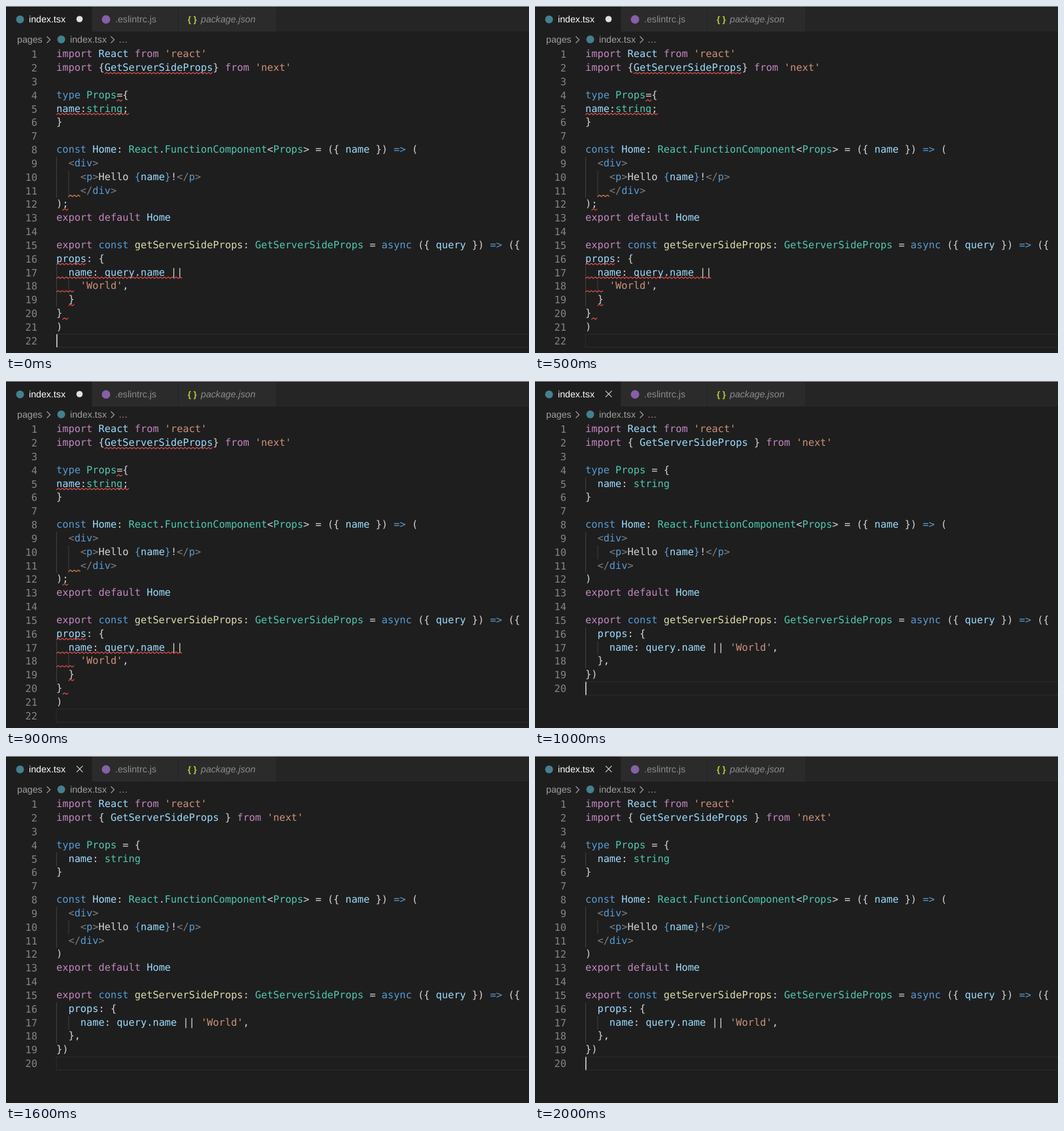
Animation of 800 by 530 pixels, one loop 2.1 s. Source, as an HTML page:

```html
<!DOCTYPE html>
<html lang="en">
<head>
<meta charset="utf-8">
<title>Format on save</title>
<style>
html, body { margin: 0; height: 100%; overflow: hidden; background: #1e1e1e; }
svg { display: block; text-rendering: geometricPrecision; }
text { white-space: pre; }
.code { font: 15.306px "DejaVu Sans Mono", monospace; }
.ui { font: 14.2px "Liberation Sans", Arial, sans-serif; }
</style>
</head>
<body>
<svg width="800" height="530" viewBox="0 0 800 530">
  <rect width="800" height="39" fill="#252526"/>
  <rect width="131" height="39" fill="#1e1e1e"/>
  <rect x="132" width="131" height="39" fill="#2b2b2b"/>
  <rect x="264" width="149" height="39" fill="#2b2b2b"/>
  <rect width="800" height="1" fill="#a8a8a8"/>
  <g class="ui" fill="#a0a0a0">
    <circle cx="21.5" cy="20.5" r="6" fill="#44808f"/>
    <text x="35" y="25" fill="#fff">index.tsx</text>
    <circle cx="153" cy="20.5" r="6.5" fill="#8560a8"/>
    <text x="167" y="25" fill="#8c8c8c">.eslintrc.js</text>
    <text x="278" y="24.5" fill="#cbcb41" font-weight="bold" font-size="13">{ }</text>
    <text x="298" y="25" fill="#8c8c8c" font-style="italic">package.json</text>
    <text x="17" y="56">pages</text>
    <circle cx="84.5" cy="51" r="6" fill="#44808f"/>
    <text x="98" y="56">index.tsx</text>
    <text x="172" y="56">…</text>
    <path d="M62.5 46.5l5 5-5 5M160.5 46.5l5 5-5 5" fill="none" stroke="#a0a0a0" stroke-width="1.2"/>
  </g>
  <circle id="unsaved" cx="112.5" cy="20" r="4.8" fill="#e0e0e0"/>
  <path id="close" d="M108 15.2l9.4 9.4m0-9.4l-9.4 9.4" stroke="#d0d0d0" stroke-width="1.2"/>
  <g id="messy" class="code"></g>
  <g id="tidy" class="code"></g>
  <rect id="caret" x="77" width="1.6" height="20" fill="#d0d0d0"/>
</svg>
<script>
const LEFT = 77, TOP = 63.8, CHAR = 9.215, LINE = 20.83;
const LOOP = 2100, SAVE = 1000, BLINK = 500;

// "~x" switches the colour of the text that follows
const colors = {
  p: '#c586c0', k: '#569cd6', t: '#4ec9b0', v: '#9cdcfe',
  f: '#dcdcaa', s: '#ce9178', d: '#d4d4d4', g: '#808080'
};

const tidy = [
  "~pimport ~vReact ~pfrom ~s'react'",
  "~pimport ~d{ ~vGetServerSideProps ~d} ~pfrom ~s'next'",
  "",
  "~ktype ~tProps ~d= {",
  "  ~vname~d: ~tstring",
  "~d}",
  "",
  "~kconst ~vHome~d: ~tReact~d.~tFunctionComponent~d<~tProps~d> = ({ ~vname ~d}) ~k=> ~d(",
  "  ~g<~kdiv~g>",
  "    ~g<~kp~g>~dHello ~k{~vname~k}~d!~g</~kp~g>",
  "  ~g</~kdiv~g>",
  "~d)",
  "~pexport default ~vHome",
  "",
  "~pexport ~kconst ~fgetServerSideProps~d: ~tGetServerSideProps ~d= ~kasync ~d({ ~vquery ~d}) ~k=> ~d({",
  "  ~vprops~d: {",
  "    ~vname~d: ~vquery~d.~vname ~d|| ~s'World'~d,",
  "  ~d},",
  "~d})",
  ""
];

const messy = [...tidy];
messy[1] = "~pimport ~d{~vGetServerSideProps~d} ~pfrom ~s'next'";
messy[3] = "~ktype ~tProps~d={";
messy[4] = "~vname~d:~tstring~d;";
messy[10] = "    ~g</~kdiv~g>";
messy[11] = "~d);";
messy.splice(15, 5,
  "~vprops~d: {",
  "  ~vname~d: ~vquery~d.~vname ~d||",
  "    ~s'World'~d,",
  "  ~d}",
  "~d}",
  "~d)",
  "");

const RED = '#dc4f4c', ORANGE = '#d9824a';
// row, first column, end column, colour
const problems = [
  [1, 8, 26, RED], [3, 10, 11, RED], [4, 0, 12, RED], [10, 2, 4, ORANGE],
  [11, 1, 2, RED], [15, 0, 5, RED], [16, 0, 21, RED], [17, 0, 3, RED],
  [18, 2, 3, RED], [19, 1, 2, RED]
];

const $ = id => document.getElementById(id);
const escape = s => s.replace(/</g, '&lt;').replace(/>/g, '&gt;');
const rowTop = row => TOP + row * LINE;
const colX = col => LEFT + col * CHAR;

function drawLine(line, row) {
  const indent = line.search(/\S|$/), top = rowTop(row);
  let out = `<text x="48" y="${top + 15.5}" text-anchor="end" fill="#858585">${row + 1}</text>`;
  for (let col = 0; col < indent; col += 2)
    out += `<rect x="${colX(col)}" y="${top}" width="1" height="${LINE}" fill="#404040"/>`;
  let col = indent;
  for (const part of line.trim().split('~').slice(1)) {
    const word = part.slice(1);
    out += `<text x="${colX(col)}" y="${top + 14.5}" fill="${colors[part[0]]}">${escape(word)}</text>`;
    col += word.length;
  }
  return out;
}

function squiggle([row, from, to, color]) {
  const end = colX(to);
  let x = colX(from), d = `M${x} ${rowTop(row + 1) - 1.8}`;
  for (let up = true; x + 2 < end; x += 3, up = !up)
    d += `q1.5 ${up ? -.4 : .4} 3 ${up ? -2.2 : 2.2}`;
  return `<path d="${d}" fill="none" stroke="${color}" stroke-width="1.2"/>`;
}

function drawCode(lines, marks) {
  const y = rowTop(lines.length - 1);
  return `<rect x="77" y="${y}" width="730" height="20" fill="none" stroke="#282828" stroke-width="1.6"/>` +
    lines.map(drawLine).join('') + marks.map(squiggle).join('');
}

$('messy').innerHTML = drawCode(messy, problems);
$('tidy').innerHTML = drawCode(tidy, []);

const show = (id, on) => $(id).setAttribute('visibility', on ? 'visible' : 'hidden');

function frame(now) {
  const t = now % LOOP, saved = t >= SAVE;
  show('messy', !saved);
  show('unsaved', !saved);
  show('tidy', saved);
  show('close', saved);
  show('caret', Math.floor(t / BLINK) % 2 === 0);
  $('caret').setAttribute('y', rowTop((saved ? tidy : messy).length - 1));
  requestAnimationFrame(frame);
}
frame(0);
</script>
</body>
</html>
```
